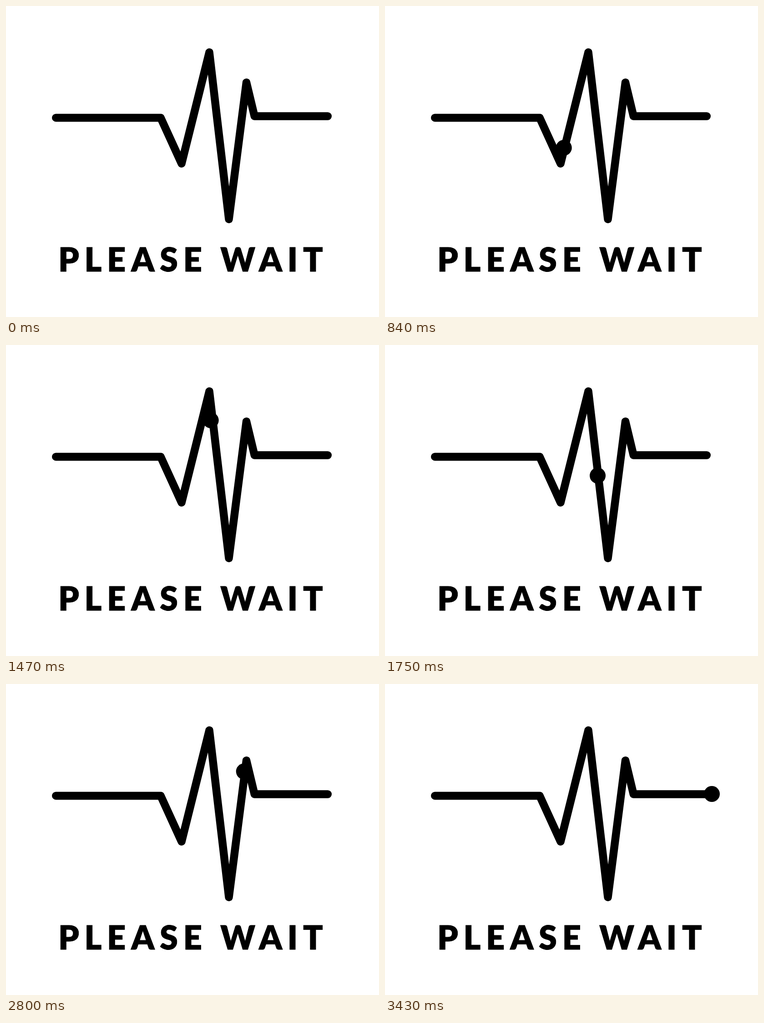
Recreate the animation shown at these times as an HTML page. Size 820 by 683 pixels, loop 3.5 s.

```html
<!DOCTYPE html>
<html lang="en">
<head>
<meta charset="utf-8">
<title>Please wait</title>
<style>
  html, body { margin: 0; width: 100%; height: 100%; overflow: hidden; background: #fff; }
  svg { display: block; width: 820px; height: 683px; }
  text { font: 900 72px Lato, "Open Sans", sans-serif; stroke: #000; stroke-width: 0.8px; }
</style>
</head>
<body>
<svg viewBox="0 0 820 683">
  <polyline fill="none" stroke="#000" stroke-width="17.5" stroke-linecap="round" stroke-linejoin="round"
    points="109.7,245.4 340,245.4 386,346 447,101.7 490,468.2 528.5,168 546.3,242 707.3,242"/>
  <circle id="dot" r="17.5" visibility="hidden"/>
  <text id="label" y="582.8">PLEASE WAIT</text>
</svg>
<script>
  const LOOP = 3500, STEP = 70;
  const dot = document.getElementById('dot');
  const label = document.getElementById('label');

  // Space the letters evenly so the ink runs from left to right edge
  function fit(left, right) {
    const pen = document.createElement('canvas').getContext('2d');
    const text = label.textContent;
    pen.font = '900 72px Lato, "Open Sans", sans-serif';
    const m = pen.measureText(text);
    const ink = m.actualBoundingBoxLeft + m.actualBoundingBoxRight;
    label.setAttribute('x', left + m.actualBoundingBoxLeft);
    label.style.letterSpacing = (right - left - ink) / (text.length - 1) + 'px';
  }
  fit(120, 696);

  // Corners of the dot's route: step, x, y
  const route = [
    [1, 113.5, 244.5],
    [7.7, 340, 244.5],
    [11.1, 387, 338],
    [19, 441.5, 104.5],
    [31.1, 494, 472.5],
    [41, 526.5, 160.5],
    [43.6, 543.5, 241.5],
    [49, 718.5, 241.5]
  ];

  function place(n) {
    dot.setAttribute('visibility', n < 1 ? 'hidden' : 'visible');
    if (n < 1) return;
    const i = Math.max(1, route.findIndex(p => p[0] >= n));
    const [n0, x0, y0] = route[i - 1], [n1, x1, y1] = route[i];
    const k = (n - n0) / (n1 - n0);
    dot.setAttribute('cx', x0 + (x1 - x0) * k);
    dot.setAttribute('cy', y0 + (y1 - y0) * k);
  }

  const start = performance.now();
  function draw() {
    const t = Math.max(0, performance.now() - start) % LOOP;
    place(Math.floor(t / STEP));
    requestAnimationFrame(draw);
  }
  draw();
</script>
</body>
</html>
```
